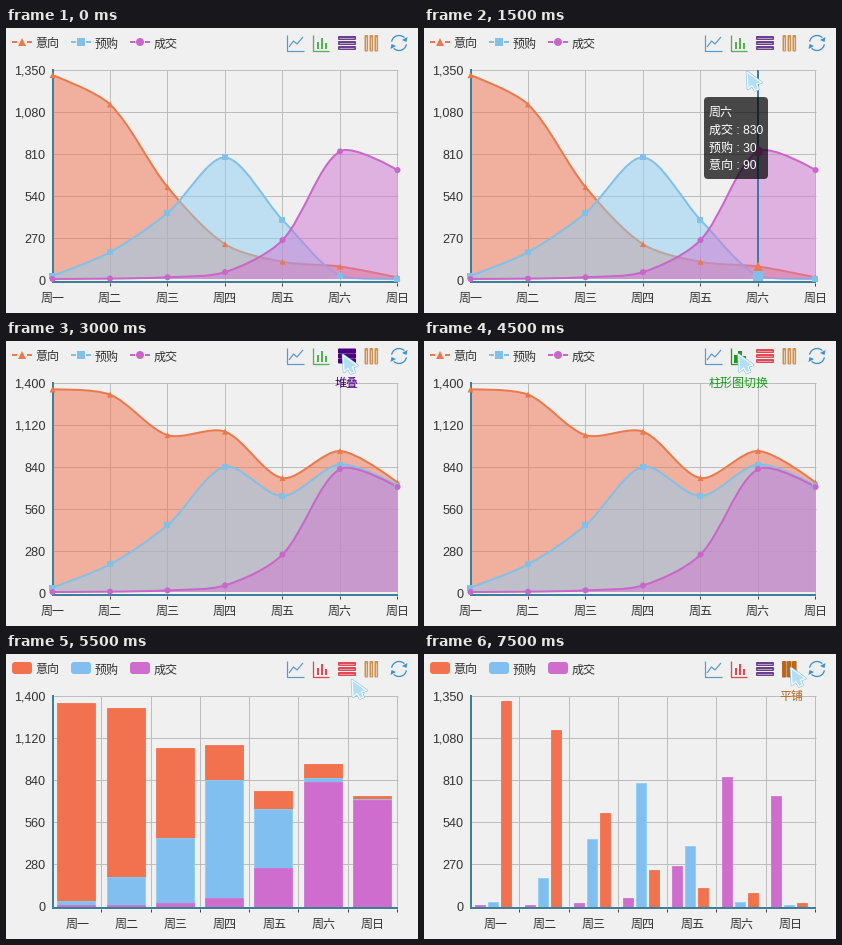
Animation of 412x285 px, one loop 8000 ms. Source, as a matplotlib script:

```python
import numpy as np
import matplotlib.pyplot as plt
from matplotlib.animation import FuncAnimation
from matplotlib.patches import Arc, Circle, FancyBboxPatch, PathPatch, Polygon, Rectangle
from matplotlib.path import Path

W, H, DPI = 412, 285, 100
PX = 72 / DPI
plt.rcParams["font.family"] = ["Liberation Sans", "Noto Sans CJK JP"]

LEFT, RIGHT, TOP, BASE = 46, 391, 42, 252
DAYS = ["周" + c for c in "一二三四五六日"]
NAMES = ["意向", "预购", "成交"]
DATA = np.array([
    [1320, 1132, 601, 234, 120, 90, 20],
    [30, 182, 434, 791, 390, 30, 10],
    [10, 12, 21, 54, 260, 830, 710],
])
STACKED = DATA[::-1].cumsum(axis=0)[::-1]
LINE_COLORS = ["#ea7a4c", "#82c0e8", "#c966c9"]
FILL_COLORS = ["#f2714e", "#8ccff2", "#d074d2"]
BAR_COLORS = ["#f2714f", "#80bfef", "#cf6dcf"]
SHAPES = ["triangle", "square", "circle"]

BLUE, GREEN, PURPLE, BROWN = "#5a98d0", "#55b055", "#68408c", "#d0904f"
RED = "#e6484f"
HOVER = {
    "stack": ("堆叠", 341, "#4b0082"),
    "bar": ("柱形图切换", 314.5, "#1f9a1f"),
    "tile": ("平铺", 367, "#b8671c"),
}

fig = plt.figure(figsize=(W / DPI, H / DPI), dpi=DPI, facecolor="#f0f0f0")
ax = fig.add_axes([0, 0, 1, 1])


def line(xs, ys, color, width=1, z=1):
    ax.plot(xs, ys, color=color, lw=width * PX, zorder=z, solid_capstyle="butt")


def text(x, y, s, color="#333333", ha="left", z=5, size=12):
    ax.text(x, y, s, color=color, ha=ha, va="baseline", fontsize=size * PX, zorder=z)


def rect(x, y, w, h, color, z=2, **kw):
    ax.add_patch(Rectangle((x, y), w, h, fc=color, zorder=z, **{"lw": 0, **kw}))


def rounded(x, y, w, h, r, color, z=2, alpha=1):
    ax.add_patch(FancyBboxPatch((x, y), w, h, fc=color, lw=0, zorder=z, alpha=alpha,
                                boxstyle=f"round,pad=0,rounding_size={r}"))


def symbol(shape, x, y, r, color, z=4):
    if shape == "triangle":
        patch = Polygon([(x, y - r), (x + r, y + r), (x - r, y + r)], fc=color, lw=0, zorder=z)
    elif shape == "square":
        patch = Rectangle((x - r, y - r), 2 * r, 2 * r, fc=color, lw=0, zorder=z)
    else:
        patch = Circle((x, y), r, fc=color, lw=0, zorder=z)
    ax.add_patch(patch)


def smooth_path(pts, tension=0.3):
    lo, hi = (LEFT, TOP), (RIGHT + 1, BASE)
    before, after = pts.copy(), pts.copy()
    for i in range(1, len(pts) - 1):
        v = (pts[i + 1] - pts[i - 1]) * tension
        d0 = np.hypot(*(pts[i] - pts[i - 1]))
        d1 = np.hypot(*(pts[i + 1] - pts[i]))
        before[i] = np.clip(pts[i] - v * d0 / (d0 + d1), lo, hi)
        after[i] = np.clip(pts[i] + v * d1 / (d0 + d1), lo, hi)
    verts = [pts[0]]
    for i in range(1, len(pts)):
        verts += [after[i - 1], before[i], pts[i]]
    return verts, [Path.MOVETO] + [Path.CURVE4] * (len(verts) - 1)


def draw_axes(top_value, slots):
    edges = [np.floor(x + 0.5) + 0.5 for x in np.linspace(LEFT, RIGHT, slots + 1)]
    for x in edges[1:]:
        line([x, x], [TOP, BASE], "#bdbdbd")
        line([x, x], [BASE + 3, BASE + 6], "#444444")
    for k in range(6):
        y = BASE - 42 * k
        if k:
            line([LEFT, RIGHT + 1], [y + 0.25] * 2, "#bdbdbd")
        text(39.5, y + 5, f"{top_value * k // 5:,}", ha="right", size=12.6)
    line([LEFT + 1] * 2, [TOP - 1, BASE + 3], "#3c7f98", 2, 3)
    line([LEFT, RIGHT + 1], [BASE + 2] * 2, "#3c7f98", 2, 3)
    for i, day in enumerate(DAYS):
        x = LEFT + 57.5 * i if slots == 6 else LEFT + (i + 0.5) * 345 / 7
        text(x + 0.5, 273.5, day, ha="center")


def draw_areas(values, top_value, focus):
    xs = np.linspace(LEFT, RIGHT, 7) + 0.5
    for k in range(3):
        pts = np.column_stack([xs, BASE + 0.5 - values[k] * 210 / top_value])
        verts, codes = smooth_path(pts)
        area = Path(verts + [(xs[-1], BASE - 1), (xs[0], BASE - 1)], codes + [Path.LINETO] * 2)
        ax.add_patch(PathPatch(area, fc=FILL_COLORS[k], alpha=0.5, lw=0, zorder=2 + k / 5))
        ax.add_patch(PathPatch(Path(verts, codes), fc="none", ec=LINE_COLORS[k],
                               lw=2 * PX, zorder=2.1 + k / 5))
        for i, (x, y) in enumerate(pts):
            big = focus and i == 5
            symbol(SHAPES[k], x, y, 5 if big else 3, LINE_COLORS[k], 3.6 + k / 10)


def draw_bars(stacked):
    scale = 210 / (1400 if stacked else 1350)
    for i in range(7):
        x = np.floor(LEFT + i * 345 / 7 + 5.8) + 0.5
        for k in range(3):
            if stacked:
                bottom = STACKED[k, i] - DATA[k, i]
                left, width = x, 38
            else:
                bottom = 0
                left, width = x + 13 * (2 - k), 9.5
            h = DATA[k, i] * scale
            y = BASE + 0.5 - bottom * scale - h
            rect(left, y, width, h, BAR_COLORS[k], 2.5, ec=FILL_COLORS[k], lw=0.6)


def draw_legend(bars):
    for k, name in enumerate(NAMES):
        x = 6 + 59 * k
        if bars:
            rounded(x, 8, 20, 12, 3, BAR_COLORS[k])
        else:
            line([x, x + 5], [14, 14], LINE_COLORS[k], 2)
            line([x + 15, x + 20], [14, 14], LINE_COLORS[k], 2)
            symbol(SHAPES[k], x + 10, 14, 4, LINE_COLORS[k])
        text(x + 24, 19.5, name)


def draw_toolbox(hover, bars, stacked):
    def style(key, color):
        return (HOVER[key][2], 1) if hover == key else (color, 0)

    line([281.5, 281.5, 298], [7, 22.5, 22.5], BLUE, 1.2)
    line([283, 287.5, 291, 297], [19, 13, 16, 9], BLUE, 1.2)

    color, bold = style("bar", RED if bars else GREEN)
    line([307.5, 307.5, 323], [7, 22.5, 22.5], color, 1.3)
    for x, y in [(311, 14), (315, 10), (319, 15)]:
        rect(x - bold / 2, y, 2 + 1.6 * bold, 22 - y - 1 + bold, color)

    color, bold = style("stack", RED if stacked else PURPLE)
    for y in (8, 13, 18):
        rounded(332, y - bold / 2, 18, 4 + bold, 1, color)
        if not bold:
            line([333.5, 348.5], [y + 2] * 2, "#c8b4c8", 0.8, 3)

    color, bold = style("tile", BROWN)
    for x in (358.5, 363.5, 368.5):
        rounded(x - bold / 2, 7, 3.6 + bold, 16.5, 1, color)
        if not bold:
            line([x + 1.8] * 2, [8.5, 22], "#ead8c4", 0.8, 3)

    refresh = "#3f90d0"
    for start in (190, 10):
        ax.add_patch(Arc((393, 15), 15, 15, theta1=start, theta2=start + 125,
                         ec=refresh, lw=1.3 * PX, zorder=2))
    for s in (1, -1):
        tip = [(8.5, -6), (7.5, -1), (3, -3)]
        ax.add_patch(Polygon([(393 + s * x, 15 + s * y) for x, y in tip],
                             fc=refresh, lw=0, zorder=2))

    if hover:
        label, x, color = HOVER[hover]
        text(x, 46, label, color, "center")


def draw_tooltip(x, y):
    rounded(x, y, 64, 82, 4, "black", 6, 0.7)
    rows = ["周六"] + [f"{NAMES[k]} : {DATA[k, 5]}" for k in (2, 1, 0)]
    for i, row in enumerate(rows):
        text(x + 5, y + 18.5 + 18 * i, row, "white", z=7)


def draw_cursor(x, y):
    arrow = np.array([(1, 1), (2, 18), (6, 14.5), (9, 19.5), (12.5, 18),
                      (10.5, 13), (15.5, 11.5)]) + (x, y)
    for ec, width in [("#7dbcdc", 2.4), ("#f4fbff", 1.3)]:
        ax.add_patch(Polygon(arrow, fc="#b4def4", ec=ec, lw=width * PX,
                             joinstyle="round", zorder=9))


# (start in ms, cursor, hovered tool, tooltip position)
POINTER = [
    (0, None, None, None),
    (500, (389, 132), None, (336, 151.5)),
    (1000, (322, 10), None, (336, 151.5)),
    (1500, (322, 43), None, (280, 69)),
    (2000, (336, 13), "stack", (240, 57)),
    (2500, (336, 13), "stack", None),
    (3500, (311, 14), "bar", None),
    (4500, (313.5, 12.5), "bar", None),
    (5500, (345, 25), None, None),
    (7000, (366, 13), "tile", None),
]


def draw(frame):
    t = frame * 500
    _, cursor, hover, tooltip = [p for p in POINTER if p[0] <= t][-1]
    bars = t >= 5000
    stacked = 3000 <= t < 7500
    top_value = 1400 if stacked else 1350

    ax.clear()
    ax.set(xlim=(0, W), ylim=(H, 0))
    ax.axis("off")
    draw_axes(top_value, 7 if bars else 6)
    if bars:
        draw_bars(stacked)
    else:
        draw_areas(STACKED if stacked else DATA, top_value, tooltip is not None)
    draw_legend(bars)
    draw_toolbox(hover, bars, stacked)
    if tooltip:
        line([334, 334], [TOP, BASE], "#3a7ca8", 2, 3.5)
        draw_tooltip(*tooltip)
    if cursor:
        draw_cursor(*cursor)
    return []


anim = FuncAnimation(fig, draw, frames=16, interval=500, init_func=lambda: [],
                     repeat=True, repeat_delay=0, blit=False)
plt.show()
```
